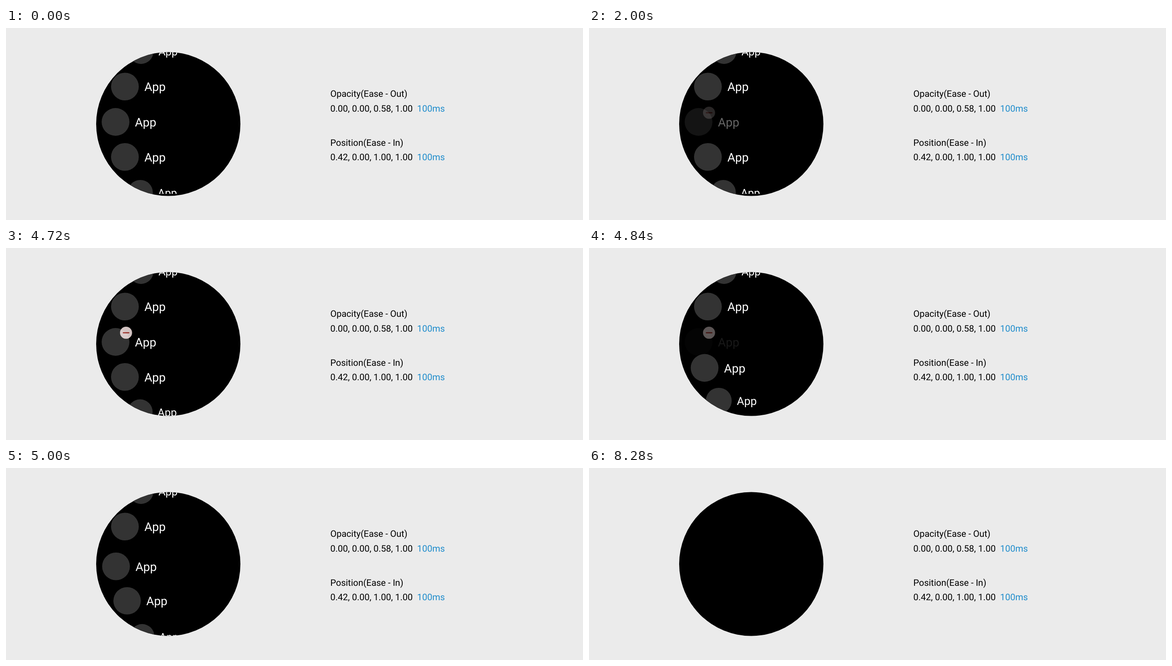
An HTML page for the animation above (8.96 s loop, 1280 by 427 pixels).

```html
<!DOCTYPE html>
<html lang="en">
<head>
<meta charset="utf-8">
<title>List item removal</title>
<style>
  html, body { margin: 0; width: 100%; height: 100%; overflow: hidden; background: #ebebeb; }
  svg { display: block; width: 100%; height: 100%; }
  text { font-family: Roboto, Arial, sans-serif; white-space: pre; text-rendering: geometricPrecision; }
  .notes { font-size: 20px; }
  .notes tspan { fill: #1e8ccc; }
  .label { font-size: 26.67px; fill: #fff; }
</style>
</head>
<body>
<svg viewBox="0 0 1280 427">
  <defs>
    <clipPath id="face"><circle cx="360" cy="213.5" r="160"/></clipPath>
    <clipPath id="viewport"><rect id="view" x="200" y="53" width="320" height="316"/></clipPath>
  </defs>
  <rect width="1280" height="427" fill="#ebebeb"/>
  <circle cx="360" cy="213.5" r="160"/>
  <g clip-path="url(#face)">
    <g id="list" clip-path="url(#viewport)"></g>
    <g id="badge">
      <circle cx="266.3" cy="188.4" r="13.4" fill="#fbe9e8"/>
      <path d="M260.3 188.4h12.2" stroke="#b5352c" stroke-width="2.5" stroke-linecap="round"/>
    </g>
  </g>
  <g class="notes">
    <text x="719.5" y="153">Opacity(Ease - Out)</text>
    <text x="719.5" y="185.7">0.00, 0.00, 0.58, 1.00&#160;&#160;<tspan>100ms</tspan></text>
    <text x="719.5" y="261.8">Position(Ease - In)</text>
    <text x="719.5" y="294.4">0.42, 0.00, 1.00, 1.00&#160;&#160;<tspan>100ms</tspan></text>
  </g>
</svg>
<script>
const LOOP = 8960, STEP = 40, LIST_END = 8280;
const NS = 'http://www.w3.org/2000/svg';
const byId = id => document.getElementById(id);
const list = byId('list'), badge = byId('badge'), view = byId('view');

const slot = (x, y, scale = 1) => ({ x, y, scale });
const slots = [
  slot(299.4, 52.2, 0.9),
  slot(263.8, 130.2),
  slot(243, 208.9),
  slot(263.8, 286.8),
  slot(298, 365.7, 0.9),
  slot(334, 446, 0.8)
];

const mix = (a, b, p) => a + (b - a) * p;
const ramp = (t, start, end) => Math.min(1, Math.max(0, (t - start) / (end - start)));
const smooth = p => p * p * (3 - 2 * p);

// cubic-bezier(0, 0, 0.58, 1)
function easeOut(x) {
  let low = 0, high = 1;
  for (let i = 0; i < 24; i++) {
    const s = (low + high) / 2;
    if (1.74 * (1 - s) * s * s + s ** 3 < x) low = s; else high = s;
  }
  return low * low * (3 - 2 * low);
}

function make(name, attrs, parent) {
  const node = document.createElementNS(NS, name);
  for (const key in attrs) node.setAttribute(key, attrs[key]);
  return parent.appendChild(node);
}

const items = slots.map(() => {
  const item = make('g', {}, list);
  make('circle', { r: 30.8, fill: '#333' }, item);
  make('text', { x: 43.1, y: 10.2, class: 'label' }, item).textContent = 'App';
  return item;
});

function place(item, from, to, p, bend) {
  const x = mix(to.x, from.x, (1 - p) ** bend);
  const y = mix(from.y, to.y, p);
  item.setAttribute('transform', `translate(${x} ${y}) scale(${mix(from.scale, to.scale, p)})`);
}

function draw(t) {
  const pressed = easeOut(ramp(t, 1000, 1100));
  const restored = easeOut(ramp(t, 2000, 2360));
  const removed = easeOut(ramp(t, 4720, 4880));
  const shown = easeOut(ramp(t, 1960, 2360));
  const hidden = ramp(t, 4680, 4930);
  const moving = t >= 4720 && t < 5080;

  list.style.display = t < LIST_END ? '' : 'none';
  view.setAttribute('height', moving ? 321 : 316);
  items[2].setAttribute('opacity', (1 - 0.6 * pressed * (1 - restored)) * (1 - removed));
  badge.setAttribute('opacity', shown * (1 - hidden));

  const near = smooth(ramp(t, 4720, 5080));
  const far = smooth(ramp(t, 4690, 5080));
  place(items[3], slots[3], slots[2], near, 1.45);
  place(items[4], slots[4], slots[3], far, 0.88);
  place(items[5], slots[5], slots[4], far, 1);
}

slots.forEach((s, i) => place(items[i], s, s, 0, 1));
const began = performance.now();
function tick() {
  const t = (performance.now() - began) % LOOP;
  draw(Math.floor(t / STEP) * STEP);
  requestAnimationFrame(tick);
}
tick();
</script>
</body>
</html>
```
